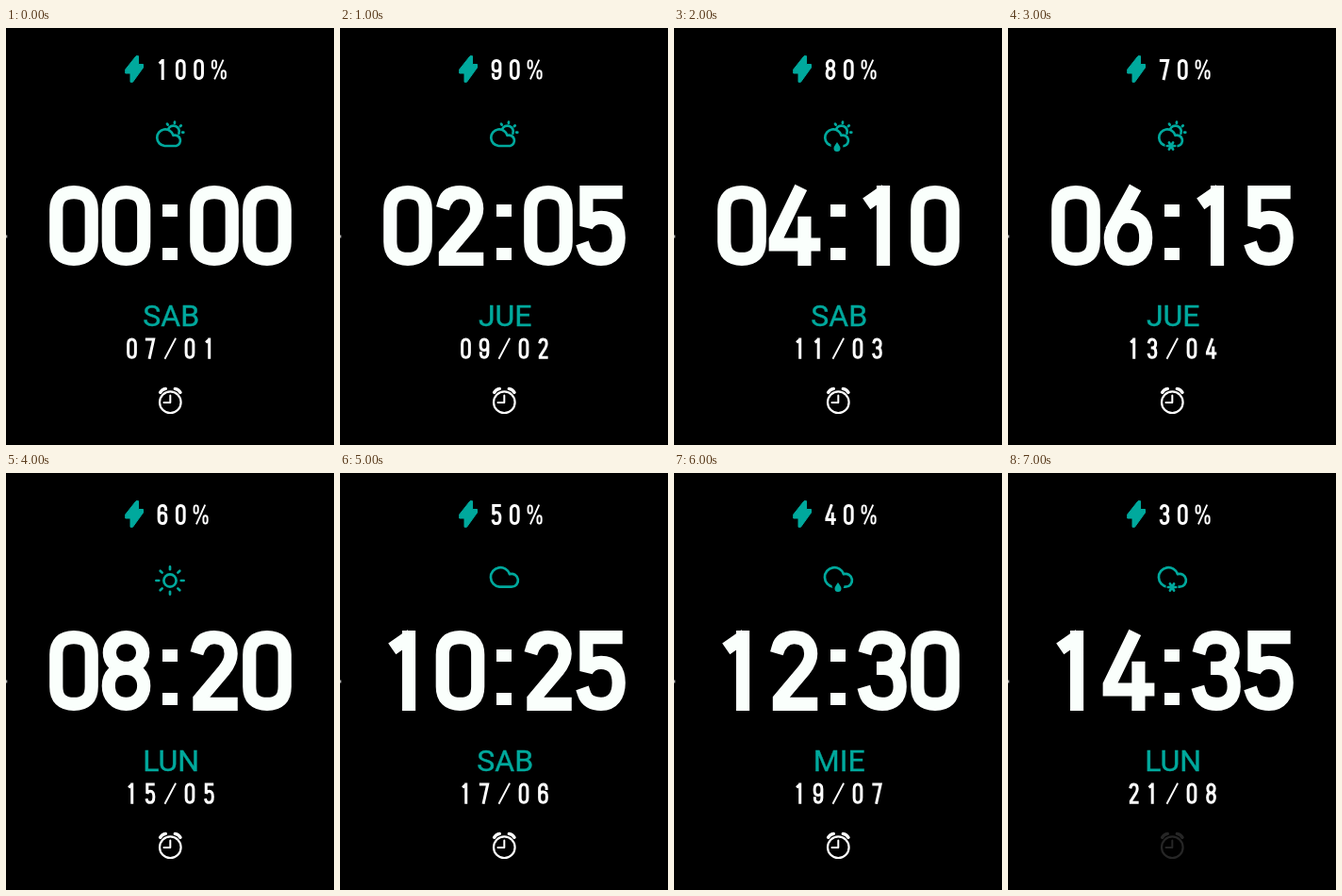
An HTML page for the animation above (8 s loop, 348 px wide and 442 px high).

```html
<!DOCTYPE html>
<html lang="es">
<head>
<meta charset="utf-8">
<title>Watch face</title>
<style>
  html, body { margin: 0; width: 100%; height: 100%; overflow: hidden; background: #000; }
  svg { display: block; }
  .line { fill: none; stroke-linecap: round; stroke-linejoin: round; stroke-width: 2.7; }
  .glyph { fill: none; stroke-linecap: square; vector-effect: non-scaling-stroke; }
  .teal { stroke: #00a99d; }
  .fill { fill: #00a99d; }
  text { font: 32px Roboto, sans-serif; text-anchor: middle; stroke-width: .4; }
</style>
</head>
<body>
<svg id="face" width="348" height="442" viewBox="0 0 348 442"></svg>
<script>
const STEP = 1000, STEPS = 8;
const WEEKDAYS = ['DOM', 'LUN', 'MAR', 'MIE', 'JUE', 'VIE', 'SAB'];
const WEATHER = ['partly', 'partly', 'showers', 'snowShowers', 'sunny', 'overcast', 'rain', 'snow'];

// Centre lines of the characters in a 52 x 85 cell
const ring = (x, y) => `M${x - 10} ${y - 4}a10 11 0 0 1 20 0v8a10 11 0 0 1-20 0z`;
const WIDE = {
  0: 'M8 26C8 14 14 8 26 8S44 14 44 26V59C44 71 38 77 26 77S8 71 8 59Z',
  1: 'M27 77V8M24 10L15.5 16',
  2: 'M10 18C12 11 18 8 26 8C36 8 43 14 43 25C43 32 40 37 36 42L11 72V77H43',
  3: 'M10 18C12 11 18 8 26 8C36 8 43 15 43 24S37 40 27 40M27 40C38 40 44 47 44 59S37 77 26 77C17 77 11 73 9 66',
  4: 'M30 9L7 57V62H46M36.5 40V77',
  5: 'M41 8H11V43C14 37 20 34 26 34C38 34 44 42 44 55S38 77 26 77C17 77 11 73 9 67',
  6: 'M30 9L12 42C9 48 8 51 8 55C8 69 15 77 26 77S44 69 44 55S37 33 26 33C20 33 15 36 12 42',
  8: 'M26 8C36 8 43 15 43 24S36 40 26 40S9 33 9 24S16 8 26 8ZM26 40C37 40 44 48 44 58S37 77 26 77S8 69 8 58S15 40 26 40Z'
};
const NARROW = {
  ...WIDE,
  6: 'M43 24C43 13 36 8 26 8S8 14 8 26V59C8 71 14 77 26 77S44 71 44 59V53C44 42 37 36 26 36S8 42 8 52',
  7: 'M9 8H43L23 77',
  9: 'M9 61C9 72 16 77 26 77S44 71 44 59V26C44 14 38 8 26 8S8 14 8 26V32C8 43 15 49 26 49S44 43 44 33',
  '/': 'M51 6L1 79',
  '%': ring(3, 23) + ring(49, 62) + 'M46 8L6 77'
};

const pad = n => String(n).padStart(2, '0');
const line = (d, cls = 'teal') => `<path class="line ${cls}" d="${d}"/>`;

// One character centred on (x, y)
const glyph = (d, x, y, sx, sy, weight, color) =>
  `<path class="glyph" d="${d}" stroke="${color}" stroke-width="${weight}"
    transform="translate(${x} ${y}) scale(${sx} ${sy}) translate(-26 -42.5)"/>`;
const big = (char, x) => glyph(WIDE[char], x, 209.5, 1.04, 1.025, 14.2, '#fafffc');
const small = (char, x, y) =>
  glyph(NARROW[char], x, y, .215, .278, /\d/.test(char) ? 3 : 1.9, '#fff');

function rays(cx, cy, from, to, angles) {
  return line(angles.map(deg => {
    const c = Math.cos(deg * Math.PI / 180), s = Math.sin(deg * Math.PI / 180);
    return `M${cx + c * from} ${cy + s * from}L${cx + c * to} ${cy + s * to}`;
  }).join(''));
}

const gap = (x, y) => `<circle cx="${x}" cy="${y}" r="6.5"/>`;
const drop = (x, y) => gap(x, y - 2) +
  `<path class="fill" d="M${x} ${y - 5}c2 3 3.5 4.5 3.5 6.5a3.5 3.5 0 0 1-7 0c0-2 1.5-3.5 3.5-6.5z"/>`;
const flake = (x, y) => gap(x, y) + rays(x, y, 0, 4.2, [0, 60, 120, 180, 240, 300]);

const cloud = line('M169 120.7A10.3 10.3 0 1 1 180 107.2A6.9 6.9 0 1 1 182 120.7Z');
const sunnyCloud = line('M168.3 125A8.8 8.8 0 1 1 177.5 113.8A5.8 5.8 0 1 1 180.5 125Z') +
  line('M172 107.5A6 6 0 0 1 183.4 111.8') +
  rays(177.5, 110.3, 9.6, 10.8, [-127, -82, -40, 2]);

const ICONS = {
  partly: sunnyCloud,
  showers: sunnyCloud + drop(173, 126),
  snowShowers: sunnyCloud + flake(173, 125),
  sunny: '<circle class="line teal" cx="174" cy="114" r="6.6"/>' +
    rays(174, 114, 11.8, 14.6, [0, 45, 90, 135, 180, 225, 270, 315]),
  overcast: cloud,
  rain: cloud + drop(174, 121),
  snow: cloud + flake(174, 121)
};

const bolt = '<path class="fill teal" stroke-linejoin="round" d="M138 29.7H140.5V38.5H145.5V42L134.5 57.3H132V48H126.7V44Z"/>';
const colon = '<path fill="#fafffc" d="M166 187h16v13h-16zM166 233h16v13h-16z"/>';
const edgeMark = '<path fill="#aaa" d="M0 219.5h1.3v3H0z"/>';

const alarm = color => `<g stroke="${color}">
  <circle class="line" style="stroke-width:2.2" cx="174.3" cy="396.7" r="11.3"/>
  <path class="line" style="stroke-width:2" d="M174.3 389.5V397H167.5"/>
  <path class="line" style="stroke-width:3.4" d="M163.6 386.3Q165.5 383 169.3 382.4M185 386.3Q183.1 383 179.3 382.4"/></g>`;

function battery(level) {
  const digits = [...String(level)];
  return digits.map((d, i) => small(d, 166 + 19.3 * i, 44)).join('') +
    small('%', 168 + 19.3 * digits.length, 44);
}

function draw(step) {
  const day = 7 + 2 * step, month = step + 1;
  const weekday = WEEKDAYS[new Date(2023, step, day).getDay()];
  const time = pad(2 * step) + pad(5 * step);
  const date = `${pad(day)}/${pad(month)}`;
  face.innerHTML = bolt + battery(100 - 10 * step) +
    ICONS[WEATHER[step]] +
    [72, 127.5, 221, 277].map((x, i) => big(time[i], x)).join('') + colon +
    `<text class="fill teal" x="175.2" y="316.4">${weekday}</text>` +
    [133.5, 153, 174.3, 195, 215.5].map((x, i) => small(date[i], x, 339.7)).join('') +
    alarm(step === STEPS - 1 ? '#262626' : '#fff') + edgeMark;
}

const face = document.getElementById('face');
let shown = -1;
function tick() {
  const step = Math.floor(performance.now() / STEP) % STEPS;
  if (step !== shown) draw(shown = step);
  requestAnimationFrame(tick);
}
tick();
</script>
</body>
</html>
```
